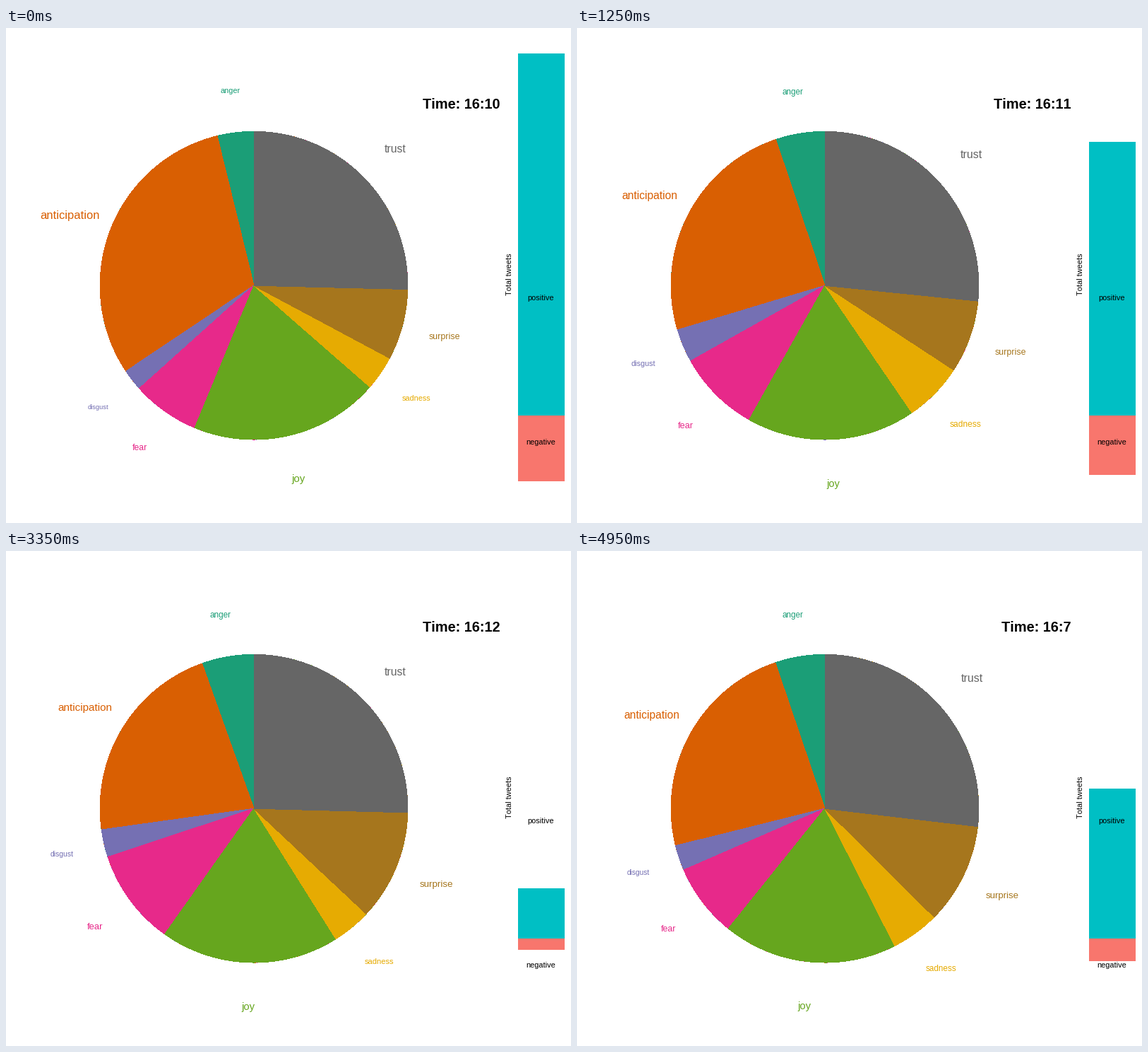
A matplotlib script for the animation above (5 s loop, 800 px wide and 700 px high).

```python
import numpy as np
import matplotlib.pyplot as plt
from matplotlib.animation import FuncAnimation
from matplotlib.patches import Rectangle, Wedge

W, H, DPI = 800, 700, 100
FRAMES, INTERVAL = 100, 50
HOLD, TWEEN, PERIOD = 11, 22, 34

plt.rcParams["font.family"] = "Liberation Sans"
plt.rcParams["text.kerning_factor"] = 6  # plain advances, no pair kerning

CENTER, RADIUS, LABEL_RADIUS = (351, 364.2), 217.8, 279
BAR_LEFT, BAR_WIDTH, BAR_SPLIT = 725, 66, 548

# Slices run anticlockwise from the top.
EMOTIONS = "anger anticipation disgust fear joy sadness surprise trust".split()

# Slice angles in degrees (trust takes the rest), then both bar heights.
KEYS = {
    "16:10": [13.8, 110, 8.1, 25.5, 71.5, 13, 26.7, 511.6, 93],
    "16:11": [20.6, 79.1, 14.4, 33.6, 60.8, 26.2, 27.7, 336, 80.2],
    "16:12": [19.7, 78.2, 10.4, 36.3, 67.6, 14.7, 41.6, 70.6, 16],
    "16:7": [18.8, 85.3, 9.5, 27.5, 65.8, 18.3, 38, 214.8, 32.3],
}
TIMES = list(KEYS)
STATES = np.array(list(KEYS.values()))
SPANS = STATES[:, :-2]


def pt(px):
    return px * 72 / DPI


def text(x, y, s, size, **kw):
    kw = {"ha": "center", "va": "baseline", "zorder": 5, **kw}
    return ax.text(x, y, s, fontsize=pt(size), **kw)


def shape(patch, color):
    patch.set(facecolor=color, linewidth=0, antialiased=False)
    return ax.add_patch(patch)


def bar(color):
    return shape(Rectangle((BAR_LEFT, BAR_SPLIT), BAR_WIDTH, 0), color)


def label_size(span):
    share = (span - SPANS.min()) / (SPANS.max() - SPANS.min())
    return 9.3 + 7.2 * np.sqrt(max(share, 0))


fig = plt.figure(figsize=(W / DPI, H / DPI), dpi=DPI, facecolor="white")
ax = fig.add_axes([0, 0, 1, 1])
ax.set_xlim(0, W)
ax.set_ylim(H, 0)
ax.axis("off")

# Each wedge reaches on round to the top; the next one covers its remainder.
wedges, labels = [], []
for n, name in enumerate(EMOTIONS):
    color = plt.cm.Dark2(n)
    wedges.append(shape(Wedge(CENTER, RADIUS, -450, -90), color))
    labels.append(text(0, 0, name, 12, color=color))

positive, negative = bar("#00BFC4"), bar("#F8766D")
text(757.5, 385, "positive", 11)
text(757.5, 589, "negative", 11)
text(716, 348.5, "Total tweets", 11, rotation=90, rotation_mode="anchor")
clock = text(699.5, 114, "", 20, ha="right", weight="bold")


def draw(i):
    stage, step = divmod(max(i - HOLD, 0), PERIOD)
    step = min(step, TWEEN)
    p = (1 - np.cos(np.pi * step / TWEEN)) / 2
    *spans, up, down = STATES[stage] + p * (STATES[stage + 1] - STATES[stage])

    start = 0
    for wedge, label, span in zip(wedges, labels, spans + [360 - sum(spans)]):
        wedge.set_theta2(-90 - start)
        size, mid = label_size(span), np.radians(start + span / 2)
        label.set_fontsize(pt(size))
        label.set_position((CENTER[0] - LABEL_RADIUS * np.sin(mid),
                            CENTER[1] - LABEL_RADIUS * np.cos(mid) + 0.4 * size))
        start += span

    positive.set_height(-up)
    negative.set_height(down)
    clock.set_text("Time: " + TIMES[stage + (step >= TWEEN // 2)])
    return wedges + labels + [positive, negative, clock]


anim = FuncAnimation(fig, draw, frames=FRAMES, interval=INTERVAL,
                     repeat=True, repeat_delay=0, blit=False)
plt.show()
```
